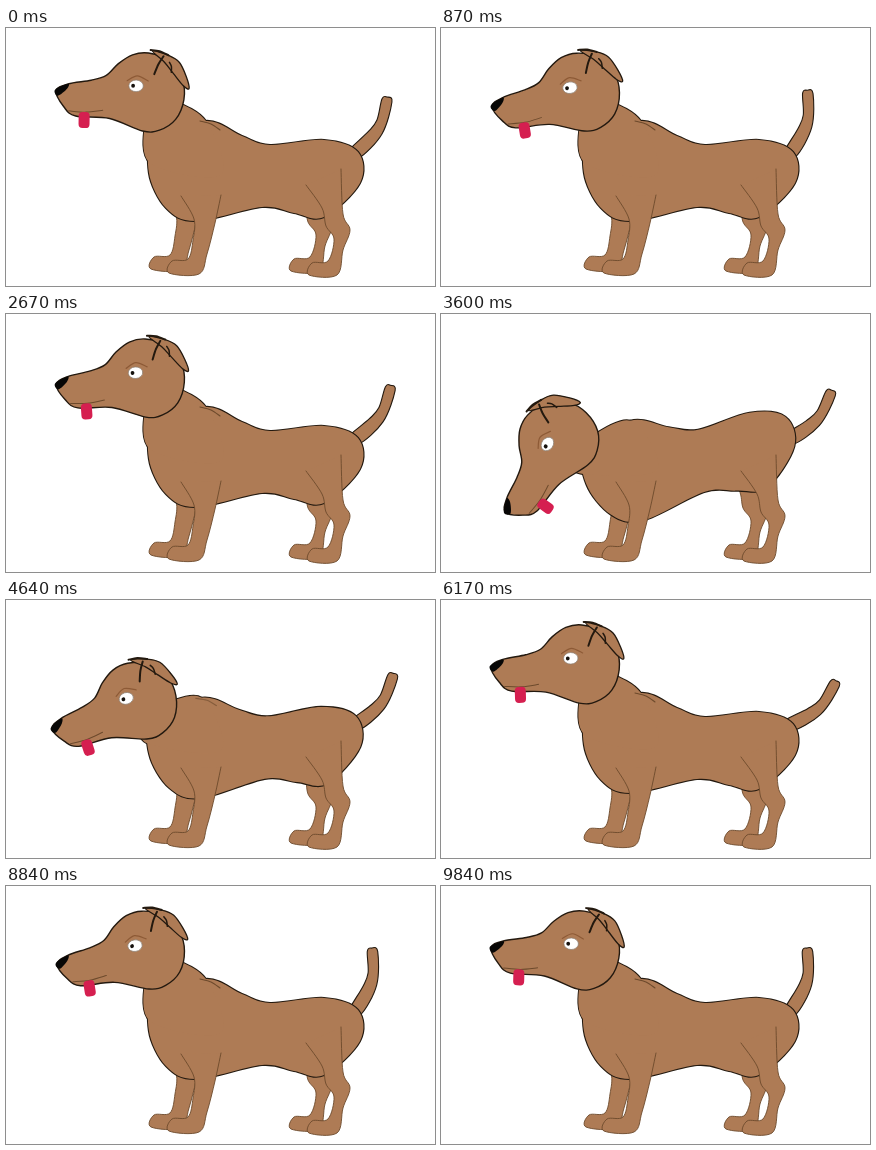
An HTML page with a canvas for the animation above (9.87 s loop, 429 px wide and 258 px high).

```html
<!DOCTYPE html>
<html lang="en">
<head>
<meta charset="utf-8">
<title>Dog</title>
<style>
  html, body { margin: 0; width: 100%; height: 100%; overflow: hidden; background: #fff; }
  canvas { display: block; width: 429px; height: 258px; }
</style>
</head>
<body>
<canvas id="stage" width="429" height="258"></canvas>
<script>
const ctx = document.getElementById('stage').getContext('2d');
const LOOP = 9.87;
const FUR = '#ae7b55', INK = '#23190f', SOFT = '#6d4a2c', RED = '#d51f50';
const RAD = Math.PI / 180;

const mix = (a, b, k) => a + (b - a) * k;
const ramp = (t, from, to) => Math.min(1, Math.max(0, (t - from) / (to - from)));

// triangle wave: 0 at whole numbers, 1 half way
const swing = x => 1 - Math.abs(1 - 2 * (x - Math.floor(x)));

function poseAt(t) {
  const down = ramp(t, 2.88, 3.6);
  const low = down * (1 - ramp(t, 4.44, 4.95));
  const sniff = down * (1 - ramp(t, 4, 4.7));
  const lean = low * low;
  return {
    x: 140 - 22 * lean,
    y: 65 + 61 * low,
    nod: mix(mix(-2, 17, swing((t + 0.1) / 3.3)), 54, sniff),
    lean,
    tail: 92 * (swing(t - 0.855) / 2) ** 0.85 - 18
  };
}

// smooth curve through a flat list of points
function spline(p, closed) {
  const n = p.length / 2;
  const at = i => {
    const k = closed ? (i + n) % n : Math.min(n - 1, Math.max(0, i));
    return [p[k * 2], p[k * 2 + 1]];
  };
  ctx.beginPath();
  ctx.moveTo(p[0], p[1]);
  for (let i = 0; i < (closed ? n : n - 1); i++) {
    const [a, b, c, d] = [at(i - 1), at(i), at(i + 1), at(i + 2)];
    ctx.bezierCurveTo(b[0] + (c[0] - a[0]) / 6, b[1] + (c[1] - a[1]) / 6,
      c[0] - (d[0] - b[0]) / 6, c[1] - (d[1] - b[1]) / 6, c[0], c[1]);
  }
}

function paint(fill, ink, width) {
  if (fill) { ctx.fillStyle = fill; ctx.fill(); }
  if (ink) { ctx.strokeStyle = ink; ctx.lineWidth = width; ctx.stroke(); }
}

function shape(p, fill, ink, width) {
  spline(p, true);
  paint(fill, ink, width);
}

function line(p, ink, width, fill) {
  spline(p, false);
  paint(fill, ink, width);
}

function oval(x, y, rx, ry, fill, ink, width) {
  ctx.beginPath();
  ctx.ellipse(x, y, rx, ry, 0, 0, Math.PI * 2);
  paint(fill, ink, width);
}

function placed(x, y, degrees, draw) {
  ctx.save();
  ctx.translate(x, y);
  ctx.rotate(degrees * RAD);
  draw();
  ctx.restore();
}

function drawTail() {
  shape([-8,4, 14,-18, 23,-30, 28,-51, 33,-53, 38,-48, 28,-16, 5,8], FUR, INK, 1.1);
}

function drawLegs() {
  line([175,168, 188,191, 187,212, 182,231, 166,233, 163,245, 193,246,
    201,226, 209,195, 215,167], SOFT, 0.9, FUR);
  line([300,157, 316,180, 320,198, 328,211, 322,233, 306,235, 303,247, 331,247,
    337,222, 344,202, 337,186, 335,141], SOFT, 0.9, FUR);
}

function drawBody({ x, y, lean }) {
  const tilt = -13 * lean;
  const [px, py] = [255, 147];
  const torso = ink => placed(px, py, tilt, () => shape(
    [-55,-54, -19,-39, 9,-30, 63,-35, 97,-23, 99,8, 63,42, 33,38, 1,32, -65,46,
      -95,33, -112,-2, -105,-35], ink ? null : FUR, ink, 2.2));

  // neck joins the head to the tilted withers and chest
  const joint = (dx, dy) => {
    const [c, s] = [Math.cos(tilt * RAD), Math.sin(tilt * RAD)];
    return [px + dx * c - dy * s, py + dx * s + dy * c];
  };
  const neck = ink => line([x + 20, y + 4, ...joint(-55, -54), ...joint(-40, 0),
    ...joint(-111, -12), x, y + 20], ink, 2, ink ? null : FUR);

  torso(INK);
  neck(INK);
  torso();
  neck();
  ctx.globalAlpha = 1 - lean;
  placed(px, py, tilt, () => line([-61,-54, -50,-51, -41,-45], SOFT, 1.1));
  ctx.globalAlpha = 1;
}

function drawHead() {
  shape([-90,-1, -78,-8, -55,-12, -40,-17, -28,-29, -14,-38, 2,-40, 22,-33, 36,-14, 38,6,
    30,26, 14,37, -3,38, -36,26, -70,24, -82,15], FUR, INK, 1.4);
  shape([-91,-2, -78,-8, -79,-3, -88,4], '#080706');
  line([-77,19, -60,20, -43,18], SOFT, 1);
  ctx.beginPath();
  ctx.roundRect(-67, 20, 11, 16, 4);
  paint(RED);

  line([-19,-12, -9,-17, 2,-12], '#8d5a36', 1.2);
  oval(-10, -7, 7.3, 5.8, '#fff', '#8b7d70', 0.7);
  oval(-13, -7, 1.9, 2, '#15110d');

  shape([6,-42, 22,-38, 33,-31, 40,-17, 43,-5, 37,-8, 27,-20, 18,-31], FUR, INK, 1.3);
  line([4,-43, 13,-42, 22,-38], INK, 2);
  line([17,-37, 12,-29, 8,-19], INK, 2);
  line([23,-31, 25,-27, 25,-21], INK, 1.5);
}

function draw(t) {
  const pose = poseAt(t);
  ctx.fillStyle = '#fff';
  ctx.fillRect(0, 0, 429, 258);
  ctx.lineCap = ctx.lineJoin = 'round';
  placed(-18, -4, 0, drawLegs);
  placed(348, 122, pose.tail, drawTail);
  drawBody(pose);
  drawLegs();
  placed(pose.x, pose.y, -pose.nod, drawHead);
}

const start = performance.now();
function tick() {
  draw((performance.now() - start) / 1000 % LOOP);
  requestAnimationFrame(tick);
}
tick();
</script>
</body>
</html>
```
